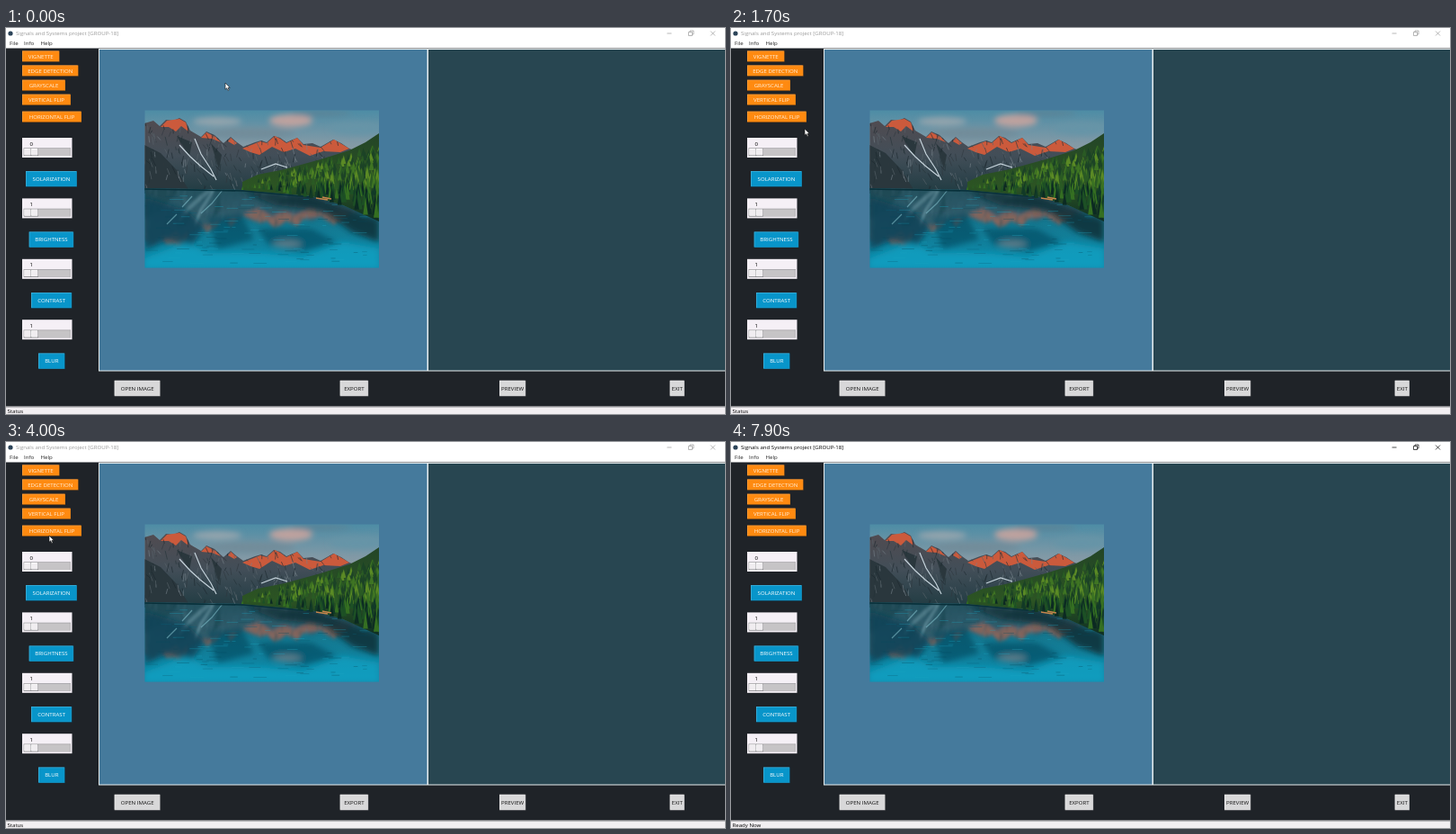
An HTML page for the animation above (8000 ms loop, 800 by 429 pixels).

```html
<!DOCTYPE html>
<html lang="en">
<head>
<meta charset="utf-8">
<title>Image editor</title>
<style>
  html, body { margin: 0; width: 100%; height: 100%; overflow: hidden; background: #1f2328; }
  svg { display: block; width: 800px; height: 429px; }
  text { font: 6.1px "Open Sans", sans-serif; white-space: pre; }
</style>
</head>
<body>
<svg id="stage" viewBox="0 0 800 429">
  <defs>
    <linearGradient id="sky" x2="0" y2="1">
      <stop stop-color="#4c8ca5"/><stop offset=".6" stop-color="#8099a6"/><stop offset="1" stop-color="#9a9da2"/>
    </linearGradient>
    <linearGradient id="rock" x2="0" y2="1">
      <stop stop-color="#514b50"/><stop offset=".5" stop-color="#424e58"/><stop offset="1" stop-color="#203b42"/>
    </linearGradient>
    <linearGradient id="lake" x2="0" y2="1">
      <stop stop-color="#0f6378"/><stop offset=".45" stop-color="#147890"/><stop offset="1" stop-color="#0a8cad"/>
    </linearGradient>
    <linearGradient id="wood" x2="0" y2="1">
      <stop stop-color="#234527"/><stop offset=".6" stop-color="#2c5423"/><stop offset="1" stop-color="#0e2e24"/>
    </linearGradient>
    <filter id="soft" x="-30%" y="-60%" width="160%" height="220%"><feGaussianBlur stdDeviation="3"/></filter>
    <filter id="ripple"><feGaussianBlur stdDeviation="1.2 2"/></filter>
    <clipPath id="frame"><rect x="154.5" y="91.5" width="260.5" height="175"/></clipPath>
    <clipPath id="water"><path d="M154 178L265 180L340 187L375 197L415 214V267H154Z"/></clipPath>
    <clipPath id="massif"><use href="#ridge"/></clipPath>
  </defs>

  <rect width="800" height="22.5" fill="#fff"/>
  <circle cx="5" cy="6" r="2.6" fill="#2b4358"/>
  <g id="caption">
    <text x="11" y="8.2">Signals and Systems project [GROUP-18]</text>
    <path d="M735.5 6H740.5M759.5 4.5H763.5V8.5H759.5ZM761 4.5V3H765V7H763.5M784 3.5L789 8.5M789 3.5L784 8.5" fill="none" stroke-width=".7"/>
  </g>
  <g fill="#222"><text x="4" y="19.3">File</text><text x="20" y="19.3">Info</text><text x="38.5" y="19.3">Help</text></g>

  <rect x="103" y="23" width="697" height="358.5" fill="#e9eff0"/>
  <rect x="104" y="24" width="364.5" height="356.5" fill="#457a9c"/>
  <rect x="470" y="24" width="330" height="356.5" fill="#284651"/>

  <g clip-path="url(#frame)">
    <rect x="154" y="91" width="262" height="60" fill="url(#sky)"/>
    <g filter="url(#soft)">
      <ellipse cx="317" cy="103" rx="24" ry="7" fill="#bda29f"/>
      <ellipse cx="235" cy="104" rx="27" ry="5" fill="#93a4ad"/>
      <ellipse cx="272" cy="117" rx="50" ry="6" fill="#728c9a"/>
      <ellipse cx="390" cy="112" rx="30" ry="7" fill="#6694a7"/>
      <ellipse cx="350" cy="95" rx="34" ry="3" fill="#5c8295"/>
    </g>
    <g id="range">
      <path id="ridge" fill="url(#rock)" d="M154 106L164 103L171 109L178 102L186 103L193 100L200 104L205 114L217 121L223 115L232 119L242 128L250 121L257 127L264 132L277 127L284 125L290 127L298 120L305 122L312 127L324 122L331 129L341 128L350 132L364 124L373 128L382 134L400 140V184H154Z"/>
      <path fill="#2a373d" d="M154 130L172 139L190 158L204 181H154ZM190 120L207 127L204 143ZM228 128L240 141L237 157Z"/>
      <path fill="#cb5a3c" d="M172 110L179 103L193 101L200 105L203 115L195 109L189 115L181 110ZM217 122L223 116L233 121L239 127L229 123ZM247 126L250 122L257 128L254 130ZM263 134L283 126L290 128L299 120L305 123L312 128L324 122L331 130L350 133L365 124L382 134L372 138L353 137L338 142L322 134L309 138L296 132L282 141L272 138Z"/>
      <g id="crags" clip-path="url(#massif)" fill="none"></g>
      <path fill="none" stroke="#c3d1d9" stroke-width="1.2" d="M210 123L217 140L228 157L234 169M193 130L205 143L216 153L231 165M284 157L300 151L313 155"/>
    </g>
    <g clip-path="url(#water)">
      <rect x="154" y="177" width="262" height="90" fill="url(#lake)"/>
      <use href="#range" transform="matrix(1 0 0 -1 0 342)" filter="url(#ripple)" opacity=".6"/>
      <g filter="url(#soft)">
        <path fill="#0a4358" opacity=".85" d="M154 188L200 202L222 222L205 244L180 236L154 247Z"/>
        <path fill="#0b3038" opacity=".85" d="M262 181L340 186L415 213V238L385 227L352 203L300 197Z"/>
        <path fill="#0b465c" opacity=".6" d="M225 211L262 207L276 235L235 246ZM280 223H340L368 238L331 248L292 241Z"/>
        <ellipse cx="313" cy="240" rx="16" ry="4" fill="#7d8790" opacity=".7"/>
        <path fill="#10a6c8" opacity=".65" d="M200 238L225 250L282 250L330 255L375 238L415 245V267H154V256Z"/>
      </g>
      <path fill="none" stroke="#7fbcc9" stroke-width="1.2" opacity=".6" d="M241 180L229 195L217 206M207 187L196 199M190 207L179 218"/>
      <g id="waves" opacity=".4"></g>
      <path fill="none" stroke="#08303a" stroke-width="1.6" d="M154 179L265 181L340 188"/>
    </g>
    <path fill="url(#wood)" d="M415 117L400 127L382 136L350 146L310 157L280 163L263 171L263 180L340 187L375 197L415 215Z"/>
    <g id="trees"></g>
    <path stroke="#c5854d" stroke-width="1.5" d="M345 189L358 191M352 188L362 190"/>
  </g>

  <g id="controls"></g>

  <rect y="420.5" width="800" height="9" fill="#f2eff2"/>
  <path d="M0 421H800" stroke="#858589"/>
  <text id="status" x="1.5" y="427.7"></text>
  <path id="cursor" d="M0 0V7.2L1.7 5.7L2.9 8.4L4.1 7.9L3 5.3H5.2Z" fill="#fff" stroke="#111" stroke-width=".6"/>
</svg>
<script>
const $ = id => document.getElementById(id);
const rect = (x, y, w, h, fill) => `<rect x="${x}" y="${y}" width="${w}" height="${h}" fill="${fill}"/>`;

function raised(x, y, w, h, fill, light, dark) {
  return rect(x, y, w, h, dark) + rect(x, y, w - .7, h - .7, light) + rect(x + .7, y + .7, w - 1.4, h - 1.4, fill);
}

function button(label, x, y, w, h, [fill, light, dark, ink]) {
  return raised(x, y, w, h, fill, light, dark) +
    `<text x="${x + w / 2}" y="${y + h / 2 + 2.2}" text-anchor="middle" fill="${ink}">${label}</text>`;
}

function slider(value, y) {
  return rect(18, y, 55.5, 22, "#f5f0f6") +
    `<text x="26.5" y="${y + 8.6}">${value}</text>` +
    rect(19.5, y + 11.3, 52.5, 8.8, "#9d9da0") + rect(20.2, y + 12, 51.5, 8, "#c6c4c6") +
    raised(20.2, y + 12, 7.9, 8, "#f0edf0", "#fff", "#77777b") +
    raised(28.1, y + 12, 7.9, 8, "#f0edf0", "#fff", "#77777b");
}

const orange = ["#ff8a10", "#ffa040", "#c86c0c", "#fff0dc"];
const blue = ["#0895ca", "#45b3dc", "#07698f", "#fff"];
const gray = ["#d8d8d9", "#ececec", "#9a9a9c", "#111"];

$("controls").innerHTML = [
  ["VIGNETTE", 25.5, 41.5], ["EDGE DETECTION", 41.5, 62.5], ["GRAYSCALE", 57.7, 48],
  ["VERTICAL FLIP", 73.7, 54], ["HORIZONTAL FLIP", 92.7, 66]
].map(([label, y, w]) => button(label, 18, y, w, 12, orange)).join("") + [
  ["SOLARIZATION", 22, 57], ["BRIGHTNESS", 25.7, 49.6], ["CONTRAST", 28, 45.3], ["BLUR", 36, 29.6]
].map(([label, x, w], i) =>
  slider(i ? 1 : 0, 122 + i * 67.4) + button(label, x, 159 + i * 67.5, w, 17.5, blue)
).join("") + [
  ["OPEN IMAGE", 120.7, 51], ["EXPORT", 371.7, 31.5], ["PREVIEW", 549, 29.3], ["EXIT", 738.7, 16.3]
].map(([label, x, w]) => button(label, x, 391.8, w, 17.5, gray)).join("");

let seed = 7;
const random = () => (seed = seed * 16807 % 2147483647) / 2147483647;
const pick = list => list[Math.floor(random() * list.length)];
const scatter = (count, make) => Array.from({ length: count }, (_, i) => make(i / count)).join("");

// Gullies and ledges on the rock faces.
$("crags").innerHTML = scatter(300, () => {
  const x = 154 + random() * 235, y = 104 + random() * 72, dx = (random() - .35) * 8;
  const color = pick(["#1c272d", "#243238", "#30383e", "#59646c", "#77838a"]);
  return `<path stroke="${color}" opacity=".6" d="M${x} ${y}l${dx} ${3 + random() * 7}"/>`;
});

$("waves").innerHTML = scatter(110, () => {
  const x = 150 + random() * 250, y = 184 + random() * 80;
  return rect(x, y, 4 + random() * 12, .8, pick(["#08495c", "#0c6078", "#1ba5c2"]));
});

// Conifers grow taller towards the right bank; nearer rows cover farther ones.
$("trees").innerHTML = scatter(300, depth => {
  const u = Math.sqrt(random()), x = 262 + u * 156;
  const edge = 176 - 54 * u, shore = 181 + 34 * u * u;
  const base = edge + (shore - edge) * (.15 + .85 * depth);
  const height = 4 + u * (6 + 15 * depth) * (.6 + random() * .5), width = 1.2 + 1.8 * u;
  const fill = pick(depth < .65
    ? ["#1c4326", "#2a5a24", "#3f7423", "#5b8a25"]
    : ["#0c2a22", "#123a27", "#1d5025", "#356f22"]);
  return `<path fill="${fill}" d="M${x - width} ${base}L${x} ${base - height}L${x + width} ${base}Z"/>`;
});

// Pointer path: time, x, y.
const path = [
  [0, 244, 61], [900, 244, 61], [1000, 256, 109], [1100, 290, 185], [1300, 345, 285],
  [1500, 220, 235], [1700, 82, 112], [1800, 52, 70], [2000, 48, 64], [2100, 48, 64],
  [2300, 100, 78], [2500, 202, 119], [2800, 285, 220], [3000, 306, 240], [3100, 307, 242],
  [3300, 298, 335], [3500, 200, 292], [3700, 105, 200], [3900, 53, 123], [4000, 48, 104],
  [4300, 45, 68], [4400, 45, 68], [4600, 44, 66], [6900, 44, 66], [7100, 80, 105],
  [7400, 230, 260], [7600, 350, 370], [7800, 399, 410], [8000, 399, 410]
];

function draw(now) {
  const t = Math.floor(now % 8000 / 100) * 100;
  const next = path.findIndex(point => point[0] > t);
  const [t0, x0, y0] = path[next - 1], [t1, x1, y1] = path[next];
  const k = (t - t0) / (t1 - t0);
  $("cursor").setAttribute("transform", `translate(${x0 + (x1 - x0) * k} ${y0 + (y1 - y0) * k})`);
  $("cursor").style.display = t < 7900 ? "" : "none";

  const active = t >= 5200, ink = active ? "#000" : "#999";
  $("caption").setAttribute("fill", ink);
  $("caption").lastElementChild.setAttribute("stroke", ink);
  $("status").textContent = active ? "Ready Now" : "Status";
}

const start = performance.now();
function tick() {
  draw(performance.now() - start);
  requestAnimationFrame(tick);
}
tick();
</script>
</body>
</html>
```
